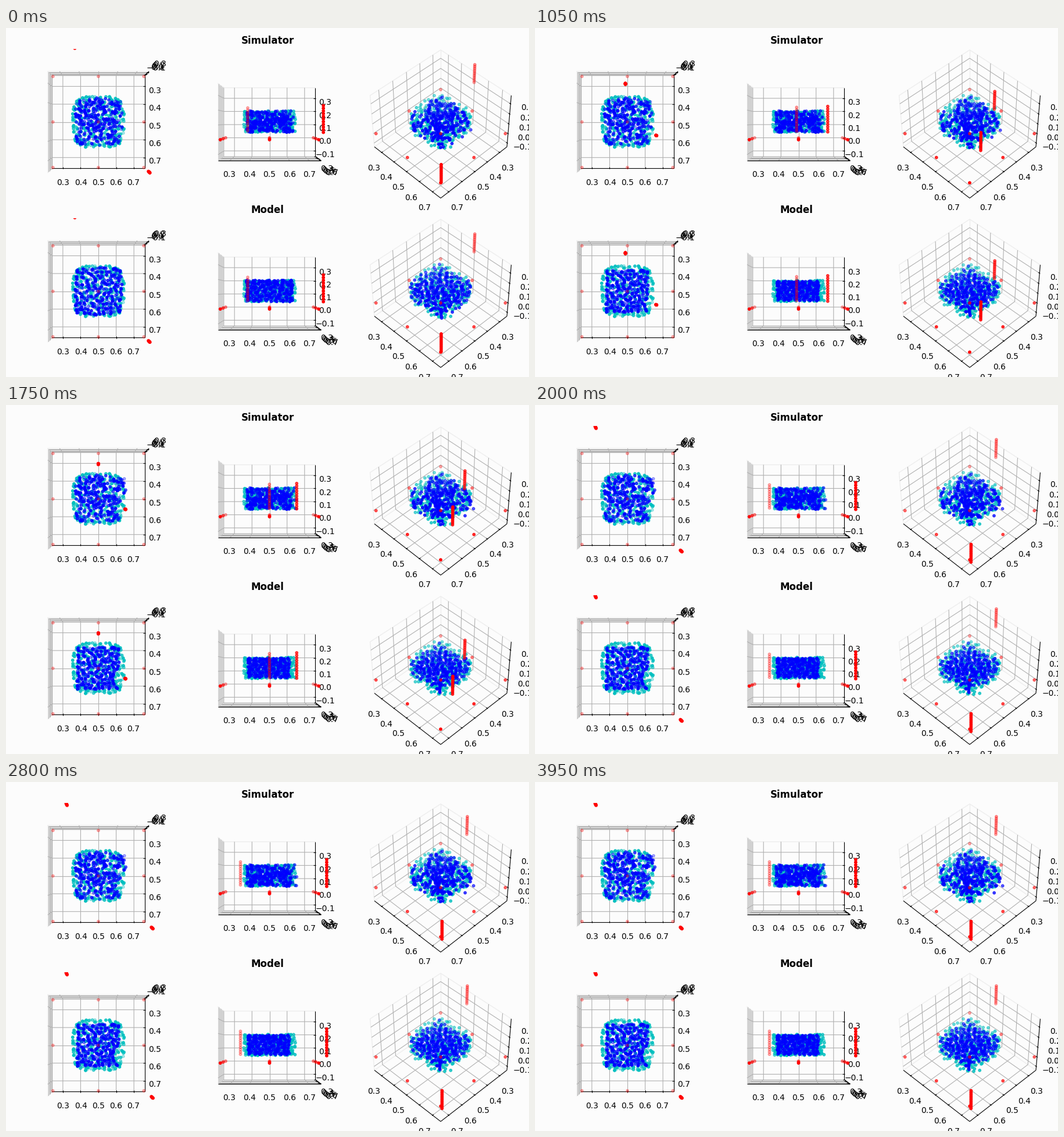
A matplotlib script for the animation above (4000 ms loop, 900x600 px).

```python
import numpy as np
import matplotlib.pyplot as plt
from matplotlib.animation import FuncAnimation
from matplotlib.collections import LineCollection
from matplotlib.transforms import Bbox, TransformedBbox

W, H, DPI = 900, 600, 100
FRAMES, STEP_MS = 80, 50
CLOSED = 23          # gripper fully closed
REGRIP = 40          # gripper jumps to its next pose

SIDE = 258.5         # panel size in pixels
SCALE = SIDE / 0.185
DIST = 10
COLS = (159.0, 453.5, 748.0)
ROWS = (161.55, 452.7)
VIEWS = ((0, 90), (0, 0), (45, 45))   # turn, elevation

CENTER = np.array([0.5, 0.5, 0.12])
ASPECT = np.array([4, 4, 3]) * 1.82946407 / np.sqrt(41) / 0.5
HALF = 0.25 * 25 / 24
LO, HI = CENTER - HALF, CENTER + HALF
DELTA = 0.5 / 12
LABEL_GAP = 0.0617

plt.rcParams["font.family"] = "DejaVu Sans"
rng = np.random.default_rng(12)

fig = plt.figure(figsize=(W / DPI, H / DPI), dpi=DPI, facecolor="#fcfcfc")
ax = fig.add_axes([0, 0, 1, 1])
ax.set(xlim=(0, W), ylim=(0, H))
ax.axis("off")


def project(points, row, col):
    """Perspective projection to stage pixels (y up) and distance from the eye."""
    x, y, z = ((np.asarray(points, float) - CENTER) * ASPECT).T
    turn, elev = np.radians(VIEWS[col])
    right = x * np.cos(turn) - y * np.sin(turn)
    near = x * np.sin(turn) + y * np.cos(turn)
    depth = DIST - near * np.cos(elev) - z * np.sin(elev)
    up = z * np.cos(elev) - near * np.sin(elev)
    xy = np.column_stack([COLS[col] + SCALE * right / depth,
                          H - ROWS[row] + SCALE * up / depth])
    return xy, depth


def draw_box(row, col):
    pane, grid, ink = [], [], []

    def line(store, *pts):
        store.append(project(pts, row, col)[0])

    def label(pos, value):
        (x, y), = project([pos], row, col)[0]
        ax.text(x, y, f"{value:.1f}".replace("-", "\u2212"), fontsize=10,
                ha="center", va="top", zorder=3)

    (x0, y0, z0), (x1, y1, z1) = LO, HI
    out, inn, gap = 0.1 * DELTA, 0.2 * DELTA, LABEL_GAP
    line(pane, (x0, y1, z0), (x0, y1, z1), (x0, y0, z1), (x1, y0, z1), (x1, y0, z0))
    line(pane, (x0, y1, z0), (x0, y0, z0), (x1, y0, z0))
    line(pane, (x0, y0, z0), (x0, y0, z1))
    for t in (0.3, 0.4, 0.5, 0.6, 0.7):
        line(grid, (t, y1, z0), (t, y0, z0), (t, y0, z1))
        line(grid, (x1, t, z0), (x0, t, z0), (x0, t, z1))
        line(ink, (t, y1 + out, z0), (t, y1 - inn, z0))
        line(ink, (x1 + out, t, z0), (x1 - inn, t, z0))
        label((t, y1 + gap, z0 - gap), t)
        label((x1 + gap, t, z0 - gap), t)
    for t in (-0.1, 0.0, 0.1, 0.2, 0.3):
        line(grid, (x1, y0, t), (x0, y0, t), (x0, y1, t))
        line(ink, (x1 + out, y0, t), (x1 - inn, y0, t))
        label((x1 + gap, y0 - gap, t), t)
    line(ink, (x0, y1, z0), (x1, y1, z0))
    line(ink, (x1, y0, z0), (x1, y1, z0))
    line(ink, (x1, y0, z0), (x1, y0, z1))
    for lines, color, width, order in ((pane, "#eeeeee", 1, 0.5),
                                       (grid, "#b0b0b0", 0.8, 1),
                                       (ink, "k", 0.8, 2)):
        ax.add_collection(LineCollection(lines, colors=color, linewidths=width,
                                         zorder=order))


class Cloud:
    """Depth-shaded scatter in one panel."""

    def __init__(self, row, col, color, zorder):
        self.row, self.col, self.color = row, col, color
        self.dots = ax.scatter([], [], s=10, zorder=zorder)
        left = COLS[col] - SIDE * 0.95 / 1.85
        bottom = H - ROWS[row] - SIDE * 0.95 / 1.85
        box = Bbox.from_bounds(left, bottom, SIDE, SIDE)
        self.dots.set_clip_box(TransformedBbox(box, ax.transData))

    def place(self, points):
        xy, depth = project(points, self.row, self.col)
        order = np.argsort(-depth)
        far = -1 / depth[order]
        far = (far - far.min()) / (far.max() - far.min())
        rgba = np.tile((*self.color, 1.0), (len(xy), 1))
        rgba[:, 3] = 1 - 0.7 * far
        self.dots.set_offsets(xy[order])
        self.dots.set_facecolor(rgba)
        self.dots.set_edgecolor(rgba)


def spread(count, tries=12):
    """Evenly spaced random points in the cube [-1, 1]^3."""
    pts = [rng.uniform(-1, 1, 3)]
    while len(pts) < count:
        cand = rng.uniform(-1, 1, (tries, 3))
        gaps = np.linalg.norm(cand[:, None] - np.array(pts), axis=2).min(axis=1)
        pts.append(cand[gaps.argmax()])
    return np.array(pts)


def slab(q, r, height, rounding, mid=(0.5, 0.5, 0.123)):
    """Map the cube to a flat block with rounded corners."""
    pull = 1 - rounding * (q[:, 0] * q[:, 1]) ** 2
    flat = r * pull
    return np.column_stack([q[:, 0] * flat, q[:, 1] * flat, q[:, 2] * height]) + mid


def ramp(n, a, b):
    return float(np.clip((n - a) / (b - a), 0, 1))


def grip(n):
    """Centres of the two fingers."""
    if n < REGRIP:
        mid, angle = np.array([0.572, 0.434]), np.radians(59.1)
        reach = max(0.1412, 0.39 - 0.0109 * n)
    else:
        mid, angle, reach = np.array([0.559, 0.4475]), np.radians(55.3), 0.403
    arm = reach * np.array([np.cos(angle), np.sin(angle)])
    return mid - arm, mid + arm


def push(points, fingers, radius):
    """Move points out of the fingers."""
    for c in fingers:
        d = points[:, :2] - c
        dist = np.linalg.norm(d, axis=1, keepdims=True)
        points[:, :2] = c + d * np.maximum(1, radius / dist)
    return points


goal = slab(spread(300), 0.142, 0.074, 0.2)
sim_seed = rng.uniform(-1, 1, (300, 3))
model_seed = spread(300)
floor = np.array([(x, y, 0) for x in (0.25, 0.5, 0.75) for y in (0.25, 0.5, 0.75)])
heights = 0.14 + 0.018 * np.arange(-5, 6)


def sim_points(n):
    p = slab(sim_seed, 0.13, 0.077, 0.14)
    p[0] = 0.621, 0.39, 0.05
    p = push(p, grip(min(n, CLOSED)), 0.052)
    u, v = p[:, 0] - 0.5, p[:, 1] - 0.5
    bulge = np.clip((u - 0.03) / 0.08, 0, 1) * np.clip(-v / 0.03, 0, 1)
    settle = 0.0015 * ramp(n, CLOSED, FRAMES)
    p[:, 0] += bulge * (0.02 * ramp(n, 20.5, CLOSED) + settle)
    return p


def model_points(n):
    k = ramp(n, 12, 21)
    p = slab(model_seed, 0.128 - 0.015 * k, 0.076 - 0.007 * k, 0.1 - 0.08 * k,
             (0.5 - 0.002 * k, 0.5, 0.123))
    return push(p, grip(min(n, CLOSED)), 0.05 + 0.018 * ramp(n, 17, CLOSED))


def tool_points(n):
    fingers = [(*c, z) for c in grip(n) for z in heights]
    return np.vstack([floor, fingers])


bodies, tools = [], []
for row, title in enumerate(("Simulator", "Model")):
    ax.text(450, H - ROWS[row] + 134.5, title, fontsize=12, fontweight="bold",
            ha="center", va="baseline")
    for col in range(3):
        draw_box(row, col)
        Cloud(row, col, (0, 0.75, 0.75), 5).place(goal)
        bodies.append(Cloud(row, col, (0, 0, 1), 6))
        tools.append(Cloud(row, col, (1, 0, 0), 7))


def update(n):
    states = sim_points(n), model_points(n)
    tool = tool_points(n)
    for body in bodies:
        body.place(states[body.row])
    for t in tools:
        t.place(tool)
    return []


anim = FuncAnimation(fig, update, frames=FRAMES, interval=STEP_MS,
                     init_func=lambda: [], repeat=True, repeat_delay=0, blit=False)
plt.show()
```
